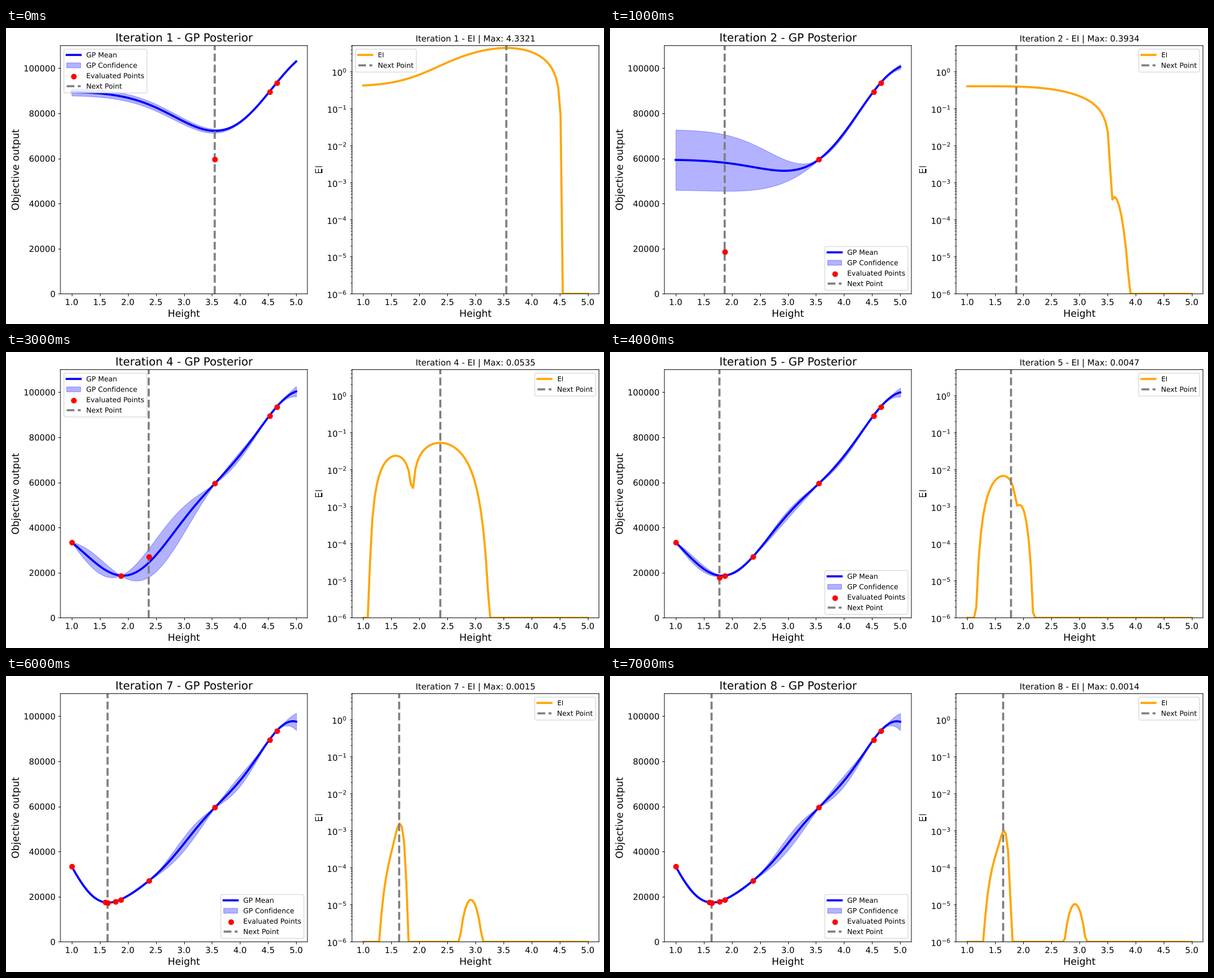
Write a matplotlib script that moves like this. It is 1000 px wide and 496 px high and loops after 8 s.

```python
import math

import matplotlib.pyplot as plt
import numpy as np
from matplotlib import patheffects
from matplotlib.animation import FuncAnimation

WIDTH, HEIGHT, DPI = 1000, 496, 84
BAND = 0.392     # half width of the confidence band, in standard deviations
NOISE = 1e-5
EI_FLOOR = 1e-6
REFIT = 5        # the kernel length is refitted after this many iterations

# Two starting samples, then the one picked in each iteration.
SAMPLE_X = np.array([4.524, 4.6553, 3.549, 1.8735, 1.0, 2.373, 1.78, 1.602, 1.64, 1.64])
SAMPLE_Y = np.array([89600, 93620, 59500, 18720, 33450, 27000, 17900, 17440, 17420, 17420])
# Acquisition value in the title; None means read it off the curve.
PEAKS = [4.3321, 0.3934, 0.3237, 0.0535, None, 0.0080, None, 0.0014]
GRID = np.linspace(1, 5, 100)

# Unhinted outline text and unsnapped lines give subpixel placement.
plt.rcParams.update({
    "font.family": "DejaVu Sans", "font.size": 10, "text.hinting": "none",
    "path.snap": False, "path.effects": [patheffects.Normal()],
})
fig = plt.figure(figsize=(WIDTH * 1.00001 / DPI, HEIGHT * 1.00001 / DPI), dpi=DPI)


def add_axes(left, right, top=29.6, bottom=445.4):
    return fig.add_axes([left / WIDTH, 1 - bottom / HEIGHT,
                         (right - left) / WIDTH, (bottom - top) / HEIGHT])


ax_gp = add_axes(91, 504)
ax_ei = add_axes(578.6, 991.6)


def rbf(a, b, length):
    return np.exp(-0.5 * ((a[:, None] - b[None, :]) / length) ** 2)


def posterior(x, y, length):
    """Mean and deviation on the grid of a unit RBF process with zero mean."""
    cross = rbf(GRID, x, length)
    weights = np.linalg.solve(rbf(x, x, length) + NOISE * np.eye(len(x)), cross.T)
    variance = 1 - np.sum(cross * weights.T, axis=1)
    return weights.T @ y, np.sqrt(np.maximum(variance, 1e-12))


def expected_improvement(mean, sigma):
    z = -mean / sigma
    cdf = 0.5 * (1 + np.vectorize(math.erf)(z / math.sqrt(2)))
    pdf = np.exp(-0.5 * z ** 2) / math.sqrt(2 * math.pi)
    return np.maximum(-mean * cdf + sigma * pdf, EI_FLOOR)


def style(ax, title, title_size, ylabel):
    ax.set_xlim(0.8, 5.2)
    ax.set_xticks(np.arange(1, 5.1, 0.5))
    ax.set_title(title, fontsize=title_size)
    ax.set_xlabel("Height", fontsize=14)
    ax.set_ylabel(ylabel, fontsize=14)
    ax.tick_params(labelsize=12)


def mark_next(ax, x):
    ax.axvline(x, color="gray", linestyle="--", linewidth=3, label="Next Point")


def draw(frame):
    iteration = frame + 1
    known = frame + 2
    x, y = SAMPLE_X[:known], SAMPLE_Y[:known]
    low, span = y.min(), np.ptp(y)
    length = 1.0 if iteration <= REFIT else 0.8
    mean, sigma = posterior(x, (y - low) / span, length)
    ei = expected_improvement(mean, sigma)
    next_x = SAMPLE_X[known]
    center, spread = low + span * mean, BAND * span * sigma

    ax_gp.clear()
    ax_gp.plot(GRID, center, color="blue", linewidth=3, label="GP Mean")
    ax_gp.fill_between(GRID, center - spread, center + spread,
                       color="blue", alpha=0.3, label="GP Confidence")
    ax_gp.scatter(SAMPLE_X[:known + 1], SAMPLE_Y[:known + 1], color="red", s=50,
                  zorder=3, label="Evaluated Points")
    mark_next(ax_gp, next_x)
    style(ax_gp, f"Iteration {iteration} - GP Posterior", 16, "Objective output")
    ax_gp.set_ylim(0, 110000)
    ax_gp.set_yticks(range(0, 100001, 20000))
    ax_gp.legend(loc="upper left" if iteration in (1, 4) else "lower right")

    ax_ei.clear()
    ax_ei.set_yscale("log")
    ax_ei.plot(GRID, ei, color="orange", linewidth=3, label="EI")
    mark_next(ax_ei, next_x)
    peak = PEAKS[frame] or np.interp(next_x, GRID, ei)
    style(ax_ei, f"Iteration {iteration} - EI | Max: {peak:.4f}", 12, "EI")
    ax_ei.set_ylim(EI_FLOOR, 5)
    ax_ei.legend(loc="upper left" if iteration == 1 else "upper right")
    return []


anim = FuncAnimation(fig, draw, frames=len(PEAKS), init_func=lambda: draw(0),
                     interval=1000, repeat=True, repeat_delay=0)
plt.show()
```
